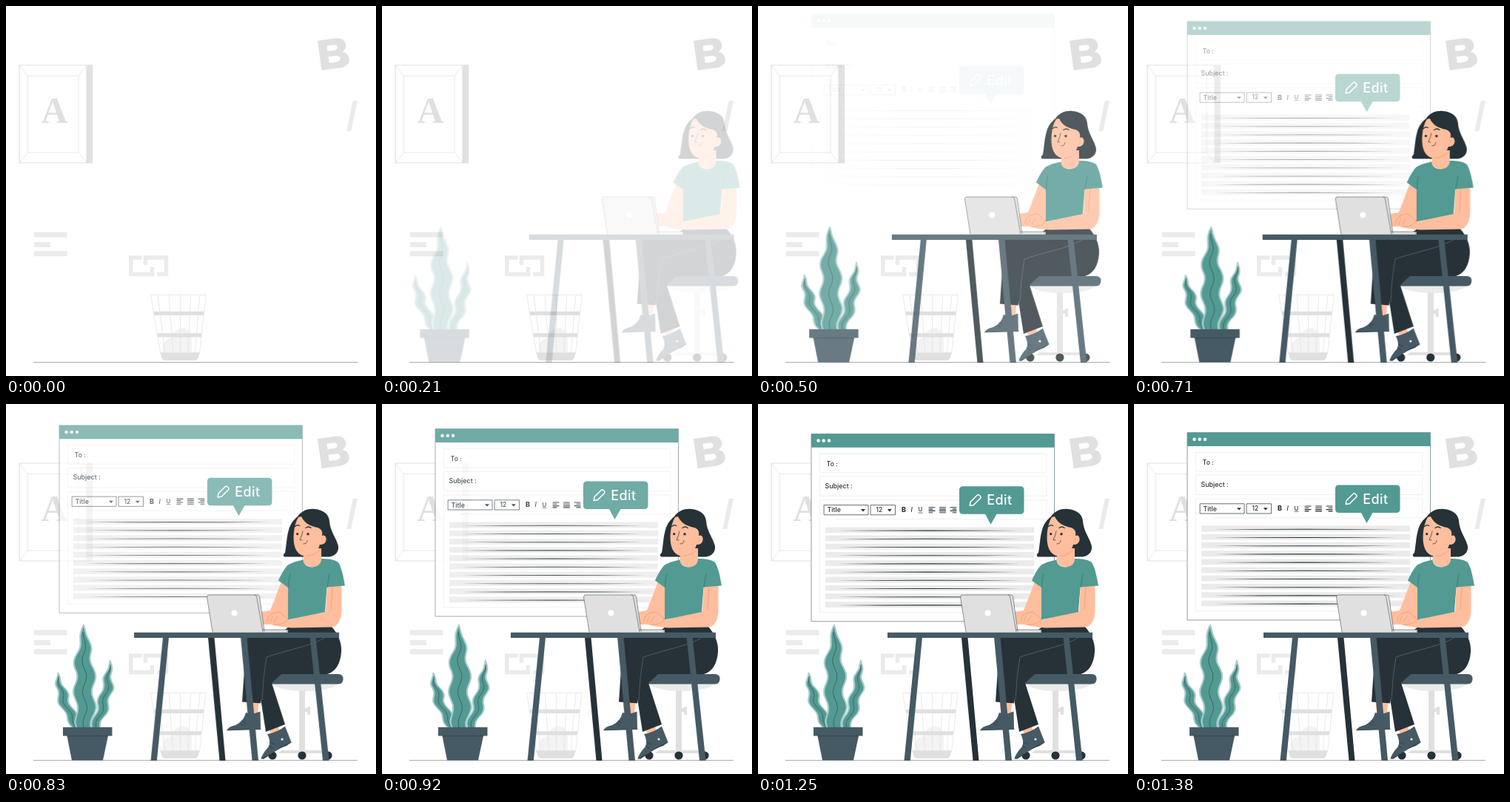
Recreate the animation shown at these times as an HTML page. Size 500 by 500 pixels, loop 1430 ms.

```html
<!DOCTYPE html>
<html lang="en">
<head>
<meta charset="utf-8">
<title>Edit text</title>
<style>
  html, body { margin: 0; width: 100%; height: 100%; overflow: hidden; background: #fff; }
  svg { display: block; width: 100%; height: 100%; }
  text { font-family: Inter, "Open Sans", sans-serif; font-weight: 500; }
  .teal { fill: #539a93; }
  .slate { fill: #455a64; }
  .dark { fill: #263238; }
  .skin { fill: #ffbe9d; }
  .pale { fill: #e0e0e0; }
  .mist { fill: #ebebeb; }
  .white { fill: #fff; }
  .line { fill: none; stroke: #263238; stroke-width: .7; stroke-linecap: round; stroke-linejoin: round; }
  .fine { stroke-width: .5; }
  .hair { fill: none; stroke: #e0e0e0; stroke-width: .7; }
  .fold { fill: none; stroke: #eb996e; stroke-width: .7; stroke-linecap: round; }
</style>
</head>
<body>
<svg viewBox="0 0 500 500">
  <!-- Room -->
  <path d="M37 481.5H475" stroke="#263238" stroke-width=".4"/>
  <g>
    <path class="pale" d="M109 79.5h8v133h-8z"/>
    <path d="M18 80h91v132H18z" fill="#fff" stroke="#e0e0e0" stroke-width="1.2"/>
    <path class="hair" d="M29.5 94.5H98V198H29.5zM18 80l11.5 14.5M109 80L98 94.5M18 212l11.5-14M109 212L98 198"/>
    <text class="pale" x="65.2" y="157.7" text-anchor="middle" style="font:bold 50px 'Liberation Serif',serif">A</text>
  </g>
  <path class="pale" fill-rule="evenodd" transform="translate(421 47) rotate(-8)"
    d="M0 0H23C32 0 37 4 37 10.5C37 15 34.5 18 31 19.5C36 21 39 24.5 39 30C39 37 33 40.5 24 40.5H0ZM11.5 8.5V16H20C27 16 27 8.5 20 8.5ZM11.5 23.5V32H21.5C29 32 29 23.5 21.5 23.5Z"/>
  <path class="mist" d="M468.8 128h6.2L466.3 169h-6zM38 305.5h44.5v7H38zM38 319h22v7H38zM38 331.3h44.5v7H38z"/>
  <path d="M183.5 340H168.8V362.5H197.5V353M188.5 350V340H216.5V362.5H204.5" fill="none" stroke="#ebebeb" stroke-width="5.5"/>
  <g>
    <path d="M211 468C210 458 213 452 222 449C226 441 230 436 240 435C248 436 251 443 251 452V468Z" fill="#f3f3f3"/>
    <path class="hair" d="M195.5 390.5H270L261.5 470H209ZM205 390.5L215 470M220 390.5L226 470M235.5 390.5V470M249.5 390.5L246 470M262 390.5L255 470"/>
    <path class="pale" d="M199.3 412.8H267.6L267 418H200.2ZM204 442.2H264.3L263.8 447.5H204.9ZM208.5 468.3H261.5L260 474Q259 479 254 479H216Q211 479 210 474Z"/>
  </g>

  <!-- Editor window -->
  <g id="editor">
    <path d="M72 38.7H400.5V292H72Z" fill="#fff" stroke="#455a64" stroke-width=".6"/>
    <path class="teal" d="M72 38.5H400.5V57H72Z"/>
    <g class="white"><circle cx="81.5" cy="47.7" r="2.2"/><circle cx="88.7" cy="47.7" r="2.2"/><circle cx="96" cy="47.7" r="2.2"/></g>
    <path d="M83.5 65.5H390V91H83.5ZM83.5 96H390V122.5H83.5ZM83.5 128H390V280H83.5ZM105 153.7H390" fill="none" stroke="#e6e6e6" stroke-width=".6"/>
    <g class="dark">
      <text x="92.8" y="81.8" font-size="8.5">To :</text>
      <text x="90.5" y="111.9" font-size="8.9">Subject :</text>
      <text x="93.5" y="144.6" font-size="8.8">Title</text>
      <text x="159.5" y="144.2" font-size="8.4">12</text>
      <text x="194" y="144.3" font-size="9" style="font-weight:800">B</text>
      <text x="206.5" y="144.3" font-size="8.5" font-style="italic">I</text>
      <text x="216.5" y="143.7" font-size="7.8">U</text>
      <path d="M139 140.3h6l-3 3.3zM174.8 140.3h6l-3 3.3z"/>
    </g>
    <path class="line" d="M89.5 134.8H149V148H89.5ZM152.5 134.8H185.5V148H152.5ZM217 145.3h5"/>
    <path class="line" style="stroke-width:1.1" d="M231 138h8M231 140.3h5M231 142.6h8M231 144.9h5M245.5 138h8M245.5 140.3h8M245.5 142.6h8M245.5 144.9h8M260 138h8M263 140.3h5M260 142.6h8M263 144.9h5"/>
    <g id="rows"></g>
    <path class="teal" d="M277 109.5H354.5Q359.5 109.5 359.5 114.5V142Q359.5 147 354.5 147H322.5L314.5 161L307 147H277Q272 147 272 142V114.5Q272 109.5 277 109.5Z"/>
    <path transform="translate(293.3 128.5) rotate(-45)" fill="none" stroke="#fff" stroke-width="1.5" stroke-linejoin="round"
      d="M-10 0L-6 -3H7Q9 -3 9 -1V1Q9 3 7 3H-6Z"/>
    <text class="white" x="309.3" y="134.7" font-size="18" letter-spacing=".4">Edit</text>
  </g>

  <!-- Plant -->
  <g id="plant">
    <g id="leaves"></g>
    <path class="slate" d="M75 436.8H141.5V448.5H136L129 481.5H87L80.5 448.5H75Z"/>
    <path d="M80.5 448.7H136" stroke="#263238" stroke-width=".5"/>
  </g>

  <!-- Woman at the desk -->
  <g id="desk">
    <path class="mist" d="M361 377H451C446 384 428 388 405 388C383 388 366 384 361 377Z"/>
    <path class="pale" d="M398 387.5H406V411H409V409H413V420H409V416H406V468H437L441 472H370L374 468H398Z"/>
    <g class="dark"><circle cx="362" cy="475" r="5.6"/><circle cx="402" cy="475" r="5.6"/><circle cx="437" cy="475" r="5.6"/></g>
    <path class="dark" d="M275 316H283.5L298.5 482H290.5Z"/>

    <path class="skin" d="M326.500 401H343.500L342 419H328ZM357 439L370 434L372 447L361 449Z"/>
    <path class="slate" d="M326 417Q336 420 345.5 415.5L346 439.5L300.5 441Q302 436 312 434Q323 429 326 417ZM355 446Q368 444 379 435.5L387.5 457L381 462Q368 466 360 473L350 480L346.5 478.5Q350 470 357 463Q360 455 355 446Z"/>
    <path class="line" d="M300.5 440.8L346 439.5M347 479.5L361 473Q369 465 387 457.5M320 428l5 3M318 431l4 3M359 457l6 3M357 462l5 3"/>
    <circle class="white" cx="375" cy="453" r="1.5"/>
    <path class="dark" d="M327 315H380L352 350L346 404.5L321 402.5Z"/>
    <path class="slate" d="M372 365H451Q457.5 365 457.5 371.5T451 378.5H357Q360 367 372 365Z"/>
    <path class="dark" d="M384 301H442C450 310 456 322 455 335C454 351 447 362 436 365H374L361 377L379 433L353 443L346 398Q348 366 353 342L370 312Z"/>
    <path d="M434 315C415 327 390 330 354 342Q349 370 348 400" fill="none" stroke="#6b777d" stroke-width=".6"/>

    <path class="dark" d="M396 152C401 144 411 141 419 142C431 143 438 149 439 158C440 172 447 179 450 189C454 199 446 207 436 206.5H378Q375 204 379 201C381 190 381 180 384 170C386 162 391 156 396 152Z"/>
    <path class="skin" d="M405 195H428V209Q428 220 416 220.5Q404 219 403.5 211Z"/>
    <path class="skin" d="M397 153C390 164 389 184 392.500 194C396 203 403 207 410 205C418 203 424 198 426 190C433 191 436 184 434 180C433 177 431 177 429 178C430 172 428 169 423 167C413 165 405 161 401 152Z"/>
    <path class="fold" d="M408 205.5Q420 205 427 196M428 181q3 1 1 5"/>
    <path class="line" d="M403 172Q402 178 399 183.5L402 184M404 189Q409 189 409 184.5"/>
    <path class="line" style="stroke-width:1.3" d="M392.5 165.5q3-3 6-1M407 167.5q4-3 7 0"/>
    <g class="dark"><circle cx="395.7" cy="175.7" r="1.6"/><circle cx="410" cy="175.7" r="1.7"/></g>

    <path class="skin" d="M374 240L384 247V292L398 288L434 280L436 245H455.5V280C455 292 450 300 443 301.5L388 302.5Q371 301 360 298H348L346 281L359 279Z"/>
    <path class="teal" d="M403.5 210.5Q404 220 416 220.5Q428 219 428 209C437 209 446 210 451 214C456 222 458 235 460 245.5L435.5 247.5L433 281L383 291.5V248L370 238.5C374 230 378 222 383 217.5Q390 213 403.5 210.5Z"/>
    <path d="M436 247.5L439 229M384 248Q383 237 386 229" fill="none" stroke="#35706a" stroke-width=".7"/>
    <path class="fold" d="M383 291.5L372 281Q362 281 357 287L355 294M362 287l-3 8M369 287l-5 8M382 292Q376 299 364 298M443 247L441 277"/>

    <path class="pale" d="M348 305H383V309H348ZM338 258H342Q344 258 344.5 260L351 307H346Z"/>
    <path class="line fine" d="M348 305H382V308"/>
    <path class="pale" d="M276 258H338Q340 258 340.5 260L349 309H281L273.5 261Q273.5 258 276 258Z"/>
    <path class="line fine" d="M281 308L273.5 261Q273.5 258 276 258H342Q344 258 344.5 260L351 307M338 258Q340 258 340.5 260L349 308"/>
    <circle class="white" cx="310.5" cy="282.5" r="4"/>
    <path class="slate" d="M175 308.8H452V316H175ZM214 315H222L205.8 482H197.5ZM319 315H327.5L343 482H334.5ZM412.500 315H420.5L438.5 482H430Z"/>
  </g>
</svg>
<script>
const $ = id => document.getElementById(id);

function add(parent, d, attrs) {
  const path = document.createElementNS('http://www.w3.org/2000/svg', 'path');
  path.setAttribute('d', d);
  for (const key in attrs) path.setAttribute(key, attrs[key]);
  parent.append(path);
}

// Grey rows, each with a thin line that tapers towards its ends
for (let i = 0; i < 10; i++) {
  const y = 164.6 + i * 11.2;
  add($('rows'), `M91 ${y}h282v7.8h-282z`, { class: 'mist' });
  add($('rows'), `M107 ${y + 4.7}q124 -1.1 248 0q-124 1.1 -248 0z`, { class: 'dark' });
}

// A wavy leaf grown from its base to its tip, bowed sideways
function leaf({ base, tip, width, bow, amp, wavelength, phase }) {
  const length = base[1] - tip[1];
  const trace = (side, inset) => {
    const points = [];
    for (let i = 0; i <= 60; i++) {
      const s = i / 60;
      const wave = amp * Math.cos((s * length - phase) / wavelength * 2 * Math.PI) * Math.min(1, 4 * (1 - s));
      const half = width * Math.min(1, .8 + s) * Math.min(1, (1 - s) / .42) ** .7;
      const spine = base[0] + (tip[0] - base[0]) * s + bow * Math.sin(Math.PI * s) + wave;
      points.push((spine + side * Math.max(0, half - inset)).toFixed(1) + ' ' + (base[1] - s * length).toFixed(1));
    }
    return points;
  };
  const shape = inset => 'M' + [...trace(-1, inset), ...trace(1, inset).reverse()].join('L') + 'Z';
  add($('leaves'), shape(0), { fill: '#a9cdc9' });
  add($('leaves'), shape(2.2), { class: 'teal' });
  add($('leaves'), 'M' + trace(0, 0).slice(0, 56).join('L'), { class: 'line fine' });
}
leaf({ base: [95, 438], tip: [68, 362], width: 8, bow: -5, amp: 2.2, wavelength: 28, phase: 20 });
leaf({ base: [119, 438], tip: [139, 345], width: 8, bow: 4, amp: 2.2, wavelength: 30, phase: 24 });
leaf({ base: [105, 438], tip: [103, 297], width: 13.5, bow: 0, amp: 2.8, wavelength: 42, phase: 28 });

const enter = (id, x, y, delay) => {
  const motion = $(id).animate(
    [{ opacity: 0, transform: `translate(${x}px, ${y}px)` }, { opacity: 1, transform: 'translate(0px, 0px)' }],
    { duration: 1000, delay, easing: 'cubic-bezier(.36, -.01, .5, 1.38)', fill: 'both' });
  motion.pause();
  return motion;
};
const motions = [
  enter('plant', -30, 0, -33),
  enter('desk', 30, 0, -33),
  enter('editor', 0, -30, 367)
];

// 24 steps per second, six to every 250 ms after the opening pause
function stepAt(ms) {
  if (ms < 130) return 0;
  const k = ms - 130;
  return Math.min(33, 3 + 6 * Math.floor(k / 250) + Math.min(5, Math.floor(k % 250 / 40)));
}

const start = performance.now();
function draw(now) {
  const time = stepAt(Math.max(0, now - start) % 1430) * 1000 / 24;
  for (const motion of motions) motion.currentTime = time;
  requestAnimationFrame(draw);
}
draw(start);
</script>
</body>
</html>
```
